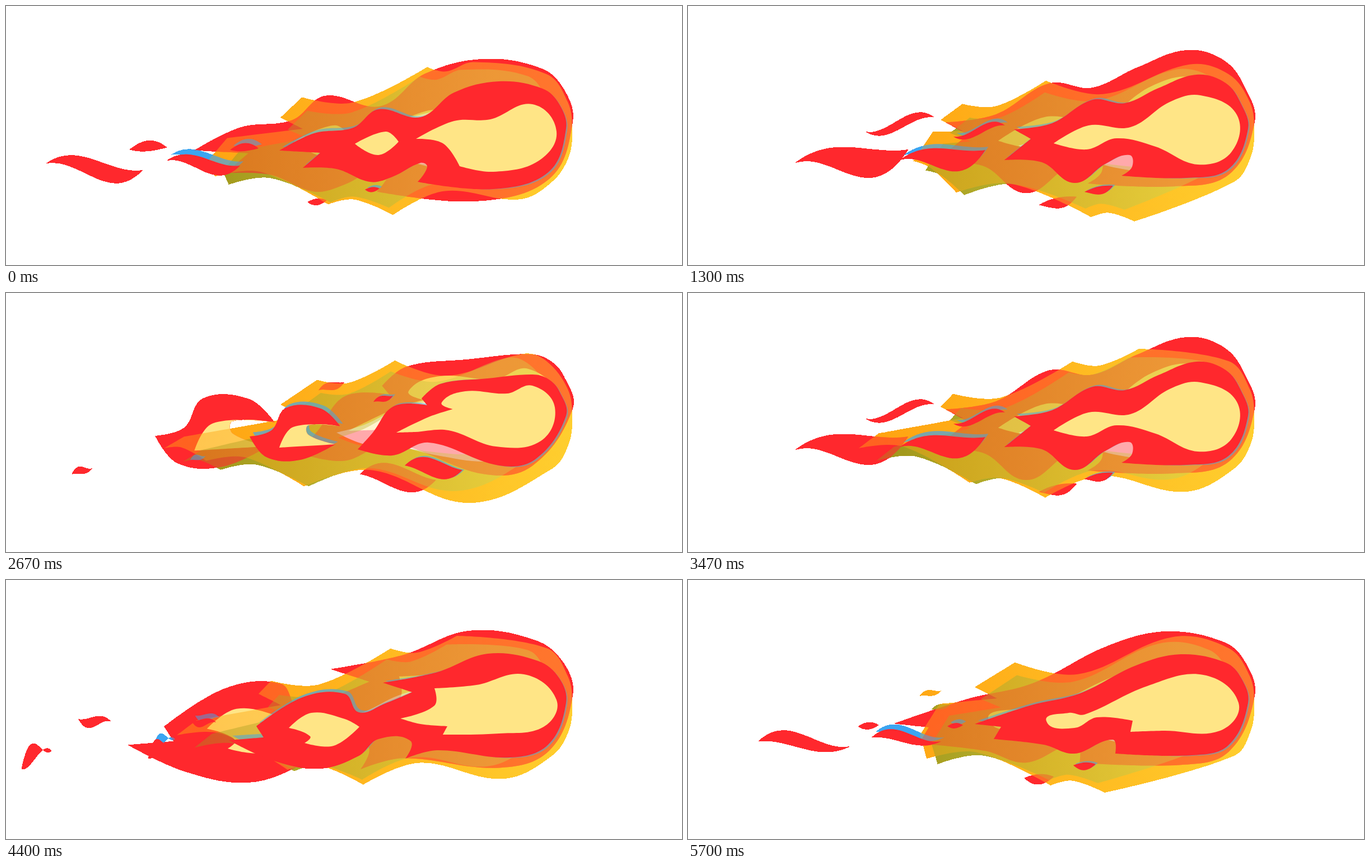
An HTML page with a canvas that plays this animation: 1207x464 px, repeating every 5730 ms.

```html
<!DOCTYPE html>
<html lang="en">
<head>
<meta charset="utf-8">
<title>Fireball</title>
<style>
  html, body { margin: 0; width: 100%; height: 100%; overflow: hidden; background: #fff; }
  canvas { display: block; }
</style>
</head>
<body>
<canvas id="stage" width="1207" height="464"></canvas>
<script>
const W = 1207, H = 464, LOOP = 5730, POSES = 18;
const RED = '#ff282d', CREAM = '#ffe586';

// Key poses of the red flame. Points marked "!" are sharp, the others smooth.
// A spark is a leaf: left tip, right tip, lean, bulge above, bulge below.
const keys = {
  0: {
    body: '958,148 880,135 800,155 740,199 665,185 620,218 550,228 488,259! 561,263! 530,290! 590,292 650,315 690,306 740,281 752,288 735,315! 870,328 968,298',
    core: ['732,238! 800,206 865,203 940,176 983,225 950,278 870,297 810,287! 780,246',
      '623,247! 678,225 701,243! 665,267'],
    sparks: [[287, 277, 418, 286, 1, 16, 24], [400, 258, 451, 255, 0, 18, 6], [641, 329, 667, 327, 0, 6, 9]]
  },
  1: {
    body: '950,145 860,132 770,165 673,184! 725,201! 675,222 630,237 605,204 530,210 447,262! 460,282! 398,287! 475,323 560,338 630,315 665,285 722,288 713,320! 770,305 900,318 968,295',
    core: ['704,248! 765,225 765,194! 840,188 925,169 983,215 960,263 880,275 780,277! 788,262! 740,258',
      '505,265! 545,238 605,249 631,263! 585,297 533,292! 543,280'],
    sparks: [[254, 320, 295, 295, 1, 35, -8], [331, 252, 375, 255, -1, 8, 14]]
  },
  6: {
    body: '968,154 940,146 860,153 775,163 742,189! 752,201! 692,203 655,250 628,280! 690,291 755,268 880,309 945,298',
    blob: '435,257! 474,246 500,206 562,207 597,239! 540,237 540,254 588,271! 525,299 465,294',
    core: ['697,250! 755,222 798,208! 778,196 820,176 895,180 940,166 980,205 955,265 875,275 790,246 730,249',
      '488,277! 513,240 597,239! 540,237 540,254 588,271!'],
    sparks: [[322, 309, 350, 301, 1, 10, 6], [656, 195, 691, 184, 1, 9, 9], [712, 309, 815, 317, .5, 26, 28]]
  },
  7: {
    body: '960,138 908,123 840,147 780,174 722,168 650,210 582,221! 612,238! 565,276! 632,280 690,317 745,283 788,267 793,288 774,304! 890,308 965,292',
    core: ['653,246! 715,214 790,217 860,172 915,160 980,195 970,262 910,284 835,252 765,237 712,257'],
    sparks: [[378, 276, 531, 258, 1, 20, 42], [474, 234, 566, 214, -1, 12, 10], [708, 333, 759, 322, .5, 7, 17]]
  },
  8: {
    body: '960,148 880,133 800,153 700,203 610,225 512,258! 559,263! 546,285! 635,295 690,311 758,286 763,311! 900,314 965,296',
    core: ['640,253 680,238 708,241 820,190 920,170 983,220 950,270 850,270 790,272! 794,252! 730,246 690,265'],
    sparks: [[328, 282, 452, 289, 1, 20, 11], [463, 262, 491, 260, 0, 8, 8], [688, 332, 728, 330, 0, 7, 16]]
  }
};
const HEAD = '1000,220 988,176 ';
const HOLLOW = '590,250! 640,236 700,207 770,187 860,165 930,165 980,215 950,285 860,302 770,291 700,275 640,271';
const TAIL_X = [395, 340, 449, 318, 437, 449];

// Affine placements, [a, b, c, d, e, f].
const FRONT = [1, 0, 0, 1, 0, 0];
const BACK = [1 / .758, 0, 0, 1 / .758, -233 / .758, -63 / .758];
const SHADE = [.993, .018, 0, 1, 9, -15.3];
const INNER = [.9, -.06, 0, .87, 62, 77];

const point = (x, y, sharp = false) => ({ x, y, sharp });

// The tail is carried along, the head and the far left stay put.
const drift = (x, d) => x - d * Math.max(0, Math.min(1, (900 - x) / 400, (x - 244) / 150));

function parse(text, d = 0) {
  return text.split(' ').map(s => {
    const [x, y] = s.replace('!', '').split(',').map(Number);
    return point(drift(x, d), y, s.endsWith('!'));
  });
}

function outline(pts) {
  const n = pts.length, at = i => pts[(i + n) % n];
  const handle = (i, side, len) => {
    const p = at(i);
    if (p.sharp) return [p.x, p.y];
    const a = at(i - 1), b = at(i + 1);
    const k = side * len * .36 / (Math.hypot(b.x - a.x, b.y - a.y) || 1);
    return [p.x + (b.x - a.x) * k, p.y + (b.y - a.y) * k];
  };
  const path = new Path2D();
  path.moveTo(pts[0].x, pts[0].y);
  for (let i = 0; i < n; i++) {
    const p = at(i), q = at(i + 1), len = Math.hypot(q.x - p.x, q.y - p.y);
    path.bezierCurveTo(...handle(i, 1, len), ...handle(i + 1, -1, len), q.x, q.y);
  }
  path.closePath();
  return path;
}

function leaf([x0, y0, x1, y1, lean, up, down], d = 0) {
  const a = drift(x0, d), b = drift(x1, d), w = .35 * (b - a);
  const near = .8 + 1.2 * lean, far = .8 - 1.2 * lean;
  const path = new Path2D();
  path.moveTo(a, y0);
  path.bezierCurveTo(a + w, y0 - up * near, b - w, y1 - up * far, b, y1);
  path.bezierCurveTo(b - w, y1 + down * near, a + w, y0 + down * far, a, y0);
  return path;
}

function join(paths) {
  const all = new Path2D();
  paths.forEach(p => all.addPath(p));
  return all;
}

// Poses between the keys 1 and 6 are those keys carried along.
function redFlame(n) {
  const key = n < 2 || n > 5 ? n : n < 4 ? 1 : 6;
  const d = 45 * (n - key), k = keys[key];
  const bodies = [HEAD + k.body].concat(k.blob || []);
  return {
    red: join([...bodies.map(t => outline(parse(t, d))), ...k.sparks.map(s => leaf(s, d))]),
    core: join(k.core.map(t => outline(parse(t, d))))
  };
}

// Golden veil: spikes swell at the head, then slide left along two envelopes.
const pace = (from, n, step) => from - n * (n > 0 ? step : 30);

function topSpike(x, sharp) {
  const u = 805 - x;
  return point(x, 100 + (u > 0 ? .16 * u + .00025 * u * u : .0006 * u * u), sharp);
}

function lowSpike(x, sharp) {
  const v = 797 - x;
  return point(x, 386 - (v > 0 ? .08 * v + .00026 * v * v : -.33 * v), sharp);
}

// Adds a hanging (+) or rising (-) curve between neighbours, right to left.
function scallop(spikes, sign) {
  return spikes.flatMap((a, i) => {
    const b = spikes[i + 1];
    if (!b) return [a];
    const y = a.y + .6 * (b.y - a.y) + sign * .14 * (a.x - b.x);
    return [a, point(a.x + .6 * (b.x - a.x), y)];
  });
}

const inOrder = (spikes, min) =>
  spikes.filter(s => s.x > min && s.x < 930).sort((a, b) => b.x - a.x);

function goldVeil(p) {
  const m = p % 3, nTop = (p + 5) % 6, nLow = (p + 2) % 6;
  const top = [-6, 0, 6].map(k => topSpike(pace(805, nTop + k, 55.3), nTop + k >= 0));
  top.push(topSpike(752 - 65.5 * p, true));
  const low = [-6, 0, 6].map(k => lowSpike(pace(797, nLow + k, 53), nLow + k >= 0));
  low.push(lowSpike(720 - 72.5 * nLow, true));

  const corner = m === 2 ? point(512, 192, true) : point(490 - 39 * m, 200 + 4 * m, true);
  const tail = point(TAIL_X[p], 222 + .27 * (449 - TAIL_X[p]), true);
  const base = point(tail.x - 35, 278, true);
  const shape = outline([
    ...parse('1011,220 1003,172 965,122'),
    ...scallop(inOrder(top, 460), 1),
    corner, point(corner.x + 40, corner.y + 20, true), tail,
    ...scallop([...inOrder(low, 340), base], -1).reverse(),
    ...parse('975,315 1005,270')
  ]);
  return m === 2 ? join([shape, leaf([413, 208, 453, 198, 1, 10, 8])]) : shape;
}

function ramp(ctx, x0, x1, left, right) {
  const g = ctx.createLinearGradient(x0, 0, x1, 0);
  g.addColorStop(0, left);
  g.addColorStop(1, right);
  return g;
}

function paint(ctx, path, place, fill, alpha = 1, rule = 'nonzero') {
  ctx.setTransform(...place);
  ctx.globalAlpha = alpha;
  ctx.fillStyle = fill;
  ctx.fill(path, rule);
}

// Every covered pixel becomes solid, which leaves the crisp outer edge.
function harden(ctx) {
  const img = ctx.getImageData(0, 0, W, H), d = img.data;
  for (let i = 3; i < d.length; i += 4) d[i] = d[i] > 70 ? 255 : 0;
  ctx.putImageData(img, 0, 0);
}

function render(pose) {
  const cv = document.createElement('canvas');
  cv.width = W;
  cv.height = H;
  const ctx = cv.getContext('2d', { willReadFrequently: true });
  const { red, core } = redFlame(pose % 9);
  const hollow = outline(parse(HOLLOW));
  const gold = join([goldVeil(pose % 6), hollow]);

  paint(ctx, red, BACK, RED);
  paint(ctx, core, BACK, CREAM);
  paint(ctx, gold, FRONT, ramp(ctx, 350, 1000, '#ffa412', '#ffce2e'), .47, 'evenodd');
  paint(ctx, hollow, FRONT, '#fff', .6);
  paint(ctx, gold, INNER, ramp(ctx, 320, 900, '#a0961a', '#d2d048'), .4, 'evenodd');
  paint(ctx, red, SHADE, '#3ca6f2', .5);
  paint(ctx, red, FRONT, RED);
  paint(ctx, core, FRONT, CREAM);
  harden(ctx);
  return cv;
}

const screen = document.getElementById('stage').getContext('2d');
const cache = Array.from({ length: POSES }, (_, i) => render(i));
const start = performance.now();
let shown = -1;

function tick() {
  const t = (performance.now() - start) % LOOP;
  // Drawings advance every 80 ms, seen on a 30 Hz grid.
  const step = Math.floor(Math.floor((t + 5) * .03) / 2.4 + 1e-6);
  const pose = step % POSES;
  if (pose !== shown) {
    shown = pose;
    screen.fillStyle = '#fff';
    screen.fillRect(0, 0, W, H);
    screen.drawImage(cache[pose], 0, 0);
  }
  requestAnimationFrame(tick);
}
tick();
</script>
</body>
</html>
```
